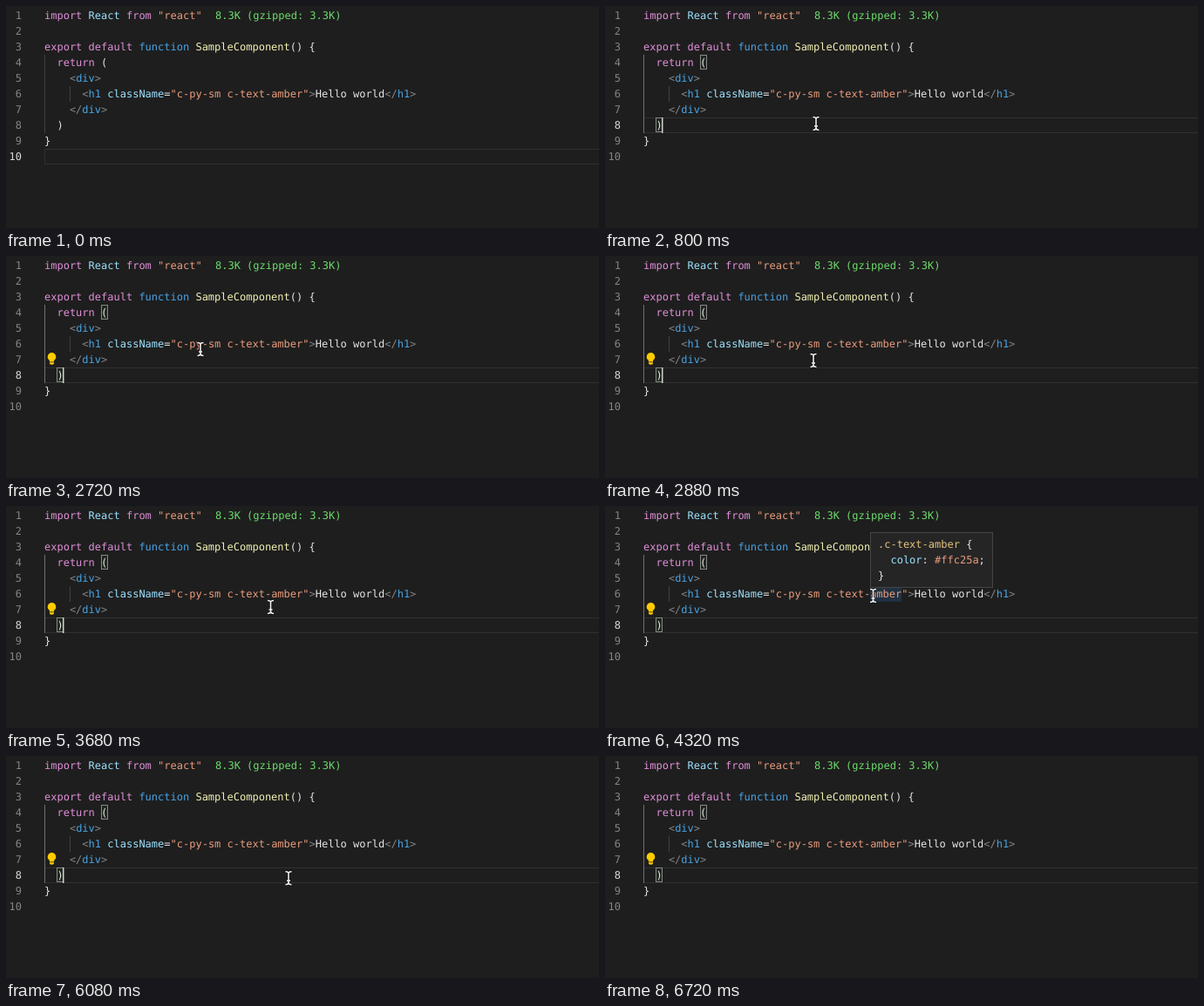
Animation, 680 px wide and 255 px high, one loop 6880 ms. Source, as an HTML page:

```html
<!DOCTYPE html>
<html lang="en">
<head>
<meta charset="utf-8">
<title>Editor hover preview</title>
<style>
  html, body { margin: 0; width: 100%; height: 100%; overflow: hidden; background: #1e1e1e; }
  svg { display: block; width: 680px; height: 255px; }
  text {
    font: 12px "DejaVu Sans Mono", monospace;
    white-space: pre;
    text-rendering: geometricPrecision;
  }
</style>
</head>
<body>
<svg id="stage" viewBox="0 0 680 255"></svg>
<script>
const LOOP = 6880, STEP = 160;
const LEFT = 44, TOP = 2, LINE = 18, CHAR = 7.224;
const COLORS = {
  pink: '#e08fd8', blue: '#47a4e6', cyan: '#9ce2ff', yellow: '#f2f2b5', orange: '#eb9c7c',
  green: '#6cdb6c', gray: '#858585', white: '#e6e6e6', gold: '#e6c47c', comment: '#6ca653', number: '#c3deb2'
};

const stage = document.getElementById('stage');

function add(parent, name, attrs = {}) {
  const node = document.createElementNS('http://www.w3.org/2000/svg', name);
  for (const key in attrs) node.setAttribute(key, attrs[key]);
  return parent.appendChild(node);
}
const rect = (parent, x, y, width, height, attrs) => add(parent, 'rect', { x, y, width, height, ...attrs });
const group = () => add(stage, 'g');
const lineTop = n => TOP + (n - 1) * LINE;
const column = c => LEFT + c * CHAR;

// Tokens alternate colour name and text.
function write(parent, x, baseline, tokens) {
  const row = add(parent, 'text', { x, y: baseline });
  for (let i = 0; i < tokens.length; i += 2)
    add(row, 'tspan', { fill: COLORS[tokens[i]] }).textContent = tokens[i + 1];
}

function popup(x, y, width, rows) {
  const box = group();
  rect(box, x + .5, y + .5, width - 1, 93 - y, { fill: '#252526', stroke: '#454545' });
  rows.forEach((tokens, i) => write(box, x + 9, y + 18 + i * LINE, tokens));
  return box;
}

const code = [
  ['pink', 'import ', 'cyan', 'React ', 'pink', 'from ', 'orange', '"react"'],
  [],
  ['pink', 'export default ', 'blue', 'function ', 'yellow', 'SampleComponent', 'white', '() {'],
  ['pink', '  return ', 'white', '('],
  ['gray', '    <', 'blue', 'div', 'gray', '>'],
  ['gray', '      <', 'blue', 'h1 ', 'cyan', 'className', 'white', '=', 'orange', '"c-py-sm c-text-amber"',
    'gray', '>', 'white', 'Hello world', 'gray', '</', 'blue', 'h1', 'gray', '>'],
  ['gray', '    </', 'blue', 'div', 'gray', '>'],
  ['white', '  )'],
  ['white', '}'],
  []
];

const activeLine = rect(stage, LEFT + .5, 0, 640, LINE - 1, { fill: 'none', stroke: '#303030' });
const guide = rect(stage, LEFT, lineTop(4), 1, 5 * LINE);
rect(stage, 73, lineTop(6), 1, LINE, { fill: '#404040' });

const highlight = (col, length) =>
  rect(stage, column(col), lineTop(6), length * CHAR, LINE, { fill: '#264f78', opacity: .4 });
const spacingWord = highlight(23, 2);
const colorWord = highlight(36, 5);

const brackets = group();
for (const [line, col] of [[4, 9], [8, 2]])
  rect(brackets, Math.round(column(col)) + .5, lineTop(line) + .5, 7, 16, { fill: '#20281f', stroke: '#888' });

const lineNumbers = code.map((tokens, i) => {
  const baseline = lineTop(i + 1) + 13;
  write(stage, LEFT, baseline, tokens);
  const label = add(stage, 'text', { x: 18, y: baseline, 'text-anchor': 'end' });
  label.textContent = i + 1;
  return label;
});
write(stage, 240, 15, ['green', '8.3K (gzipped: 3.3K)']);

const caret = rect(stage, 65, lineTop(8), 1.5, LINE, { fill: '#d0d0d0' });

const bulb = group();
add(bulb, 'path', {
  d: 'M52.5 111a4.8 4.8 0 0 1 2.6 8.8v1.7h-5.2v-1.7a4.8 4.8 0 0 1 2.6-8.8zM50 122.3h5v1.2q-.4 1.2-2.5 1.2t-2.5-1.2z',
  fill: '#ffcc00'
});

const padding = side => ['cyan', `  padding-${side}`, 'white', ': ', 'number', '1rem', 'white', '; ', 'comment', '/* 16px */'];
const spacingPopup = popup(210, 12, 264, [
  ['gold', '.c-py-sm', 'white', ' {'], padding('top'), padding('bottom'), ['white', '}']
]);
const colorPopup = popup(304, 30, 141, [
  ['gold', '.c-text-amber', 'white', ' {'],
  ['cyan', '  color', 'white', ': ', 'orange', '#ffc25a', 'white', ';'],
  ['white', '}']
]);

const pointer = group();
for (const [stroke, width] of [['#111', 3.4], ['#eee', 1.6]])
  add(pointer, 'path', {
    d: 'M-3.5-7.5Q0-7.5 0-5V5Q0 7.5-3.5 7.5M3.5-7.5Q0-7.5 0-5M0 5Q0 7.5 3.5 7.5M-2 3H2',
    fill: 'none', stroke, 'stroke-width': width
  });

// Pointer stops: time, x, y.
const path = [
  [160, 415, 219], [640, 242, 135], [800, 242, 135], [1120, 218.5, 101], [2560, 218.5, 101],
  [2720, 223, 107], [2880, 239, 120], [3360, 284, 123], [3680, 303.5, 116], [4000, 307.5, 103],
  [5760, 307.5, 103], [5920, 312, 113], [6560, 360, 222]
];

function pointerAt(t) {
  const next = Math.max(1, path.findIndex(stop => stop[0] >= t));
  const [t0, x0, y0] = path[next - 1], [t1, x1, y1] = path[next];
  const k = (t - t0) / (t1 - t0);
  return [x0 + (x1 - x0) * k, y0 + (y1 - y0) * k];
}

const show = (node, visible) => node.setAttribute('visibility', visible ? 'visible' : 'hidden');

function render(now) {
  const t = Math.floor(now % LOOP / STEP) * STEP;
  const clicked = t >= 640;
  const current = clicked ? 8 : 10;

  activeLine.setAttribute('y', lineTop(current) + .5);
  guide.setAttribute('fill', clicked ? '#707070' : '#404040');
  lineNumbers.forEach((label, i) => label.setAttribute('fill', i + 1 === current ? '#dadada' : '#858585'));
  show(brackets, clicked);
  show(caret, clicked && t < 6560 && Math.floor((t - 601) / 500) % 2 === 0);
  show(bulb, t >= 1280);

  const overSpacing = t >= 1440 && t < 2720;
  const overColor = t >= 4320 && t < 5920;
  show(spacingPopup, overSpacing);
  show(spacingWord, overSpacing);
  show(colorPopup, overColor);
  show(colorWord, overColor);

  const pointing = t >= 160 && t <= 6560;
  show(pointer, pointing);
  if (pointing) pointer.setAttribute('transform', `translate(${pointerAt(t)})`);
}

function tick() {
  render(performance.now());
  requestAnimationFrame(tick);
}
tick();
</script>
</body>
</html>
```
